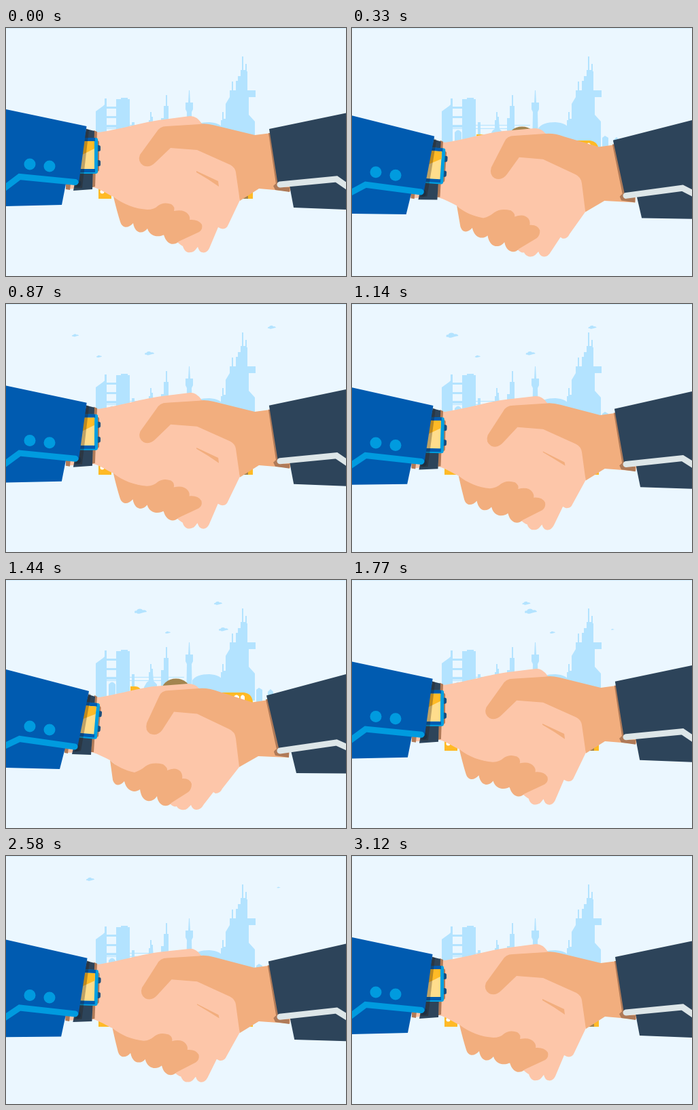
Write an HTML page that moves like this. It is 500 px wide and 366 px high and loops after 3150 ms.

```html
<!DOCTYPE html>
<html lang="en">
<head>
<meta charset="utf-8">
<title>Handshake</title>
<style>
  html, body { margin: 0; width: 100%; height: 100%; overflow: hidden; background: #ebf7ff; }
  svg { display: block; width: 500px; height: 366px; }
  .city, .cloud { fill: #b3e3ff; }
  .wire { fill: none; stroke: #b3e3ff; }
  .gold { fill: #ffba26; }
  .olive { fill: #a3854f; }
  .light { fill: #fdc6a9; }
  .tan { fill: #f2ae7e; }
  .shade { fill: #af7a58; }
  .navy { fill: #2d445a; }
  .shadow { fill: #2a1a10; opacity: .3; }
  .blue { fill: #005bb0; }
  .line { fill: none; stroke-width: 9; stroke-linecap: round; stroke-linejoin: miter; }
  .button { stroke-width: 17; }
  .sky { stroke: #009bdf; }
  .white { stroke: #dde6e8; }
  .brown { stroke: #af7a58; }
  .deep { stroke: #1e3042; }
</style>
</head>
<body>
<svg viewBox="0 0 500 366">
  <rect width="500" height="366" fill="#ebf7ff"/>
  <rect width="500" height="1" fill="#d3edfc"/>
  <g id="clouds"></g>

  <!-- skyline -->
  <g class="city">
    <path d="M132 178V123L143 115 145 113V104H148V178Z"/>
    <path d="M162 178V105H169V103H179V105H182V178Z"/>
    <path d="M148 116H162V119H148ZM148 130H162V133H148ZM148 144H162V147H148Z"/>
    <path d="M151 178V154Q156 147 161 154V178ZM185 178V139H189V178Z"/>
    <path d="M203 178V158L207 151 210 149V136H212V124H214V131H216V136L217 149 222 154V178Z"/>
    <path d="M228 178V133H232V115H235V99H237V115H239V178Z"/>
    <path d="M264 110H268L269 92H270L271 110H275V120L273 124 274 178H265L266 124 264 120Z"/>
    <path d="M274 178V148Q280 139 299 139Q316 140 320 150V178Z"/>
    <path d="M316 178V136H318V124H320V134H323V112L329 102V92H332V79H334V92H338V78H341V71H345V62H347V42H349V62H352V53H354V64H355V92H367V102H357V128L366 138V178Z"/>
    <path d="M368 180V162L372 159 377 162V180ZM385 180V165L389 161 393 165V180Z"/>
  </g>
  <path class="wire" d="M148 143.5H262M148 148.5H262"/>
  <path class="gold" d="M183 178V157H190Q197 157 200 165V178Z"/>
  <ellipse class="olive" cx="250" cy="165" rx="22" ry="19.500"/>
  <path class="gold" d="M318 166H350Q363 168 363 182V252H318Z"/>
  <path d="M335 177V172Q339 167 343 172V177ZM345 177V172Q348 167 351 172V177Z" fill="#fff"/>
  <rect class="olive" x="346" y="248" width="10" height="4"/>
  <rect class="gold" x="136" y="225" width="19" height="27"/>
  <circle cx="141.500" cy="241.500" r="3" fill="#fff"/>

  <!-- left hand and watch -->
  <path class="light" d="M88 230L120 153L137 154C175 148 200 139 232 135L270 130Q280 129 288 141L341 205L344 254L327 290Q324 298 316 296L312 294L299 325Q295 333 288 331Q284 330 282 323L278 328Q274 332 267 331Q262 329 260 322Q256 320 250 314L192 288L158 249C150 246 140 238 128 235L88 238Z"
    data-to="M86 248L122 172L138 173C175 166 195 160 217 157L268 153Q278 153 284 160L342 225L343 276L318 308Q315 315 308 315L305 313L291 331Q286 340 279 339Q274 338 272 332L267 337Q264 340 258 339Q253 338 251 334Q246 336 240 329L190 297L153 266C145 262 136 257 126 254L86 255Z"/>
  <path class="shade" d="M88 230L95 230L94 239L88 238Z" data-to="M86 247L92 247L91 256L86 255Z"/>
  <path class="shade" d="M129 151L134 153L131 234L127 235Z" data-to="M130 170L134 172L129 254L125 254Z"/>
  <path class="navy" d="M118 149L130 152L127 238L99 240L104 212Z" data-to="M121 169L131 172L125 258L97 257L103 230Z"/>
  <g id="watch">
    <rect class="shade" x="128" y="166" width="9" height="46" rx="3"/>
    <rect x="133" y="173" width="6" height="9" rx="2.500" fill="#1b4f7d"/>
    <rect x="133" y="195" width="6" height="9" rx="2.500" fill="#1b4f7d"/>
    <rect x="107" y="162" width="28" height="53" rx="3" fill="#009fe0"/>
    <path class="blue" d="M105 162H131V167H105ZM105 208H131V213H105Z"/>
    <path d="M108 167H130V208H106Z" fill="#ffdd8c"/>
    <path class="gold" d="M108 167H130V178L108 189Z"/>
  </g>
  <path class="shadow" d="M117 148L122 150L112 236L101 236Z" data-to="M121 167L125 169L110 252L100 254Z"/>
  <path class="line deep" d="M106 229L106 230" data-to="M104 247L104 248"/>
  <path class="blue" d="M0 120L118.500 145L107 229L88 230L82 261L0 263Z" data-to="M0 132L122 164L105 247L87 248L79 279L0 277Z"/>
  <path class="line sky" d="M-6 239L20 219.500L102 227.500" data-to="M-6 247L20 234.500L101 246"/>
  <path class="line button sky" d="M35 201L35 201" data-to="M35 216L35 216"/>
  <path class="line button sky" d="M64 204L64 204" data-to="M64 221L64 221"/>

  <!-- right hand -->
  <path class="tan" d="M390 155L366 158L304 143Q292 140 284 142L236 145Q226 145 221 154L197 187Q193 197 202 203Q211 207 219 199L242 177L281 180L330 202Q337 206 338 213L344 255L372 237L418 241L420 200Z"
    data-to="M386 177L362 180.500L314 165Q298 159 284 160L240 163Q228 163 225 172L207 211Q204 222 212 227Q223 231 230 221L247 194.500L281 197.500L328 220Q337 224 338 234L343 276L371 260L416 262L420 220Z"/>
  <path class="tan" d="M158 249C172 260 190 267 208 268Q218 268 224 262Q232 256 243 260Q249 264 247 270Q262 267 268 275Q271 279 270 283Q283 282 288 290Q290 297 284 301L254 315C247 322 236 320 232 305C226 309 212 309 208 296C202 304 190 305 187 288C180 296 171 296 168 286Q163 270 158 249Z"
    data-to="M153 266C162 275 175 281 189 284Q198 281 205 275Q215 268 231 272Q238 277 237 281Q250 275 257 283Q260 288 259 293Q270 292 273 301Q273 309 268 313L243 329C237 337 224 334 222 319C216 329 200 331 197 309C191 314 178 314 174 297C168 304 160 305 157 295Q155 280 153 266Z"/>
  <path id="crease" class="tan" d="M280 211L312 226L313 234Q296 222 280 213Z" data-to="M283 235L314 254L315 252Q299 246 283 235Z"/>
  <path class="shade" d="M386 155L391 155L404 235L417 235L417 242L396 239L393 233L397 230Z" data-to="M382 176L387 176L404 254L416 254L416 262L396 259L394 253L398 250Z"/>
  <path class="line brown" d="M399 233.500L404 234" data-to="M399 254L404 255"/>
  <path class="navy" d="M387 149L500 125.500L500 268L423 265L417 233L400 232Z" data-to="M383 170.500L500 139L500 285.500L427 285L419 252L402 252Z"/>
  <path class="line white" d="M403 231L486 223L506 237" data-to="M403 252L486 240L506 249"/>
</svg>
<script>
const LOOP = 3150, STEP = 30, START = 150, SHAKE = 900, SHAKES = 3;
const FADE = 90;
const $ = id => document.getElementById(id);
const mix = (a, b, p) => a + (b - a) * p;
const clamp = v => Math.min(1, Math.max(0, v));
const ease = v => (1 - Math.cos(Math.PI * clamp(v))) / 2;

const NUMBER = /-?\d+(\.\d+)?/g;
const morphs = [...document.querySelectorAll("[data-to]")].map(el => {
  const from = el.getAttribute("d");
  return { el, from, a: from.match(NUMBER).map(Number), b: el.dataset.to.match(NUMBER).map(Number) };
});

// Each track holds [time, x] pairs
const clouds = [
  { y: 73, w: 14, track: [[430, 127], [540, 148], [1440, 320], [1800, 389]] },
  { y: 46.5, w: 18, track: [[820, 95], [870, 102], [1440, 198], [2130, 334], [2580, 401], [2605, 404]] },
  { y: 77.5, w: 8, track: [[700, 107], [870, 137], [1440, 238], [2130, 357], [2250, 378]] },
  { y: 34.5, w: 12, track: [[720, 412], [870, 391], [1440, 312], [2130, 196], [2580, 124], [2760, 95]] }
];
for (const c of clouds) {
  c.el = document.createElementNS("http://www.w3.org/2000/svg", "path");
  c.el.setAttribute("class", "cloud");
  c.el.setAttribute("d", "M-9 1Q-9 -2 -6 -1Q-5 -4 -1 -4Q2 -4 3 -2Q7 -3 9 0Q9 1 6 1Q2 2 -1 3Q-5 4 -6 2Q-9 3 -9 1Z");
  $("clouds").append(c.el);
}

// 0 is the raised pose, 1 the lowered one
function pose(t) {
  const turn = (t - START) / SHAKE;
  if (turn < 0 || turn >= SHAKES) return 0;
  const u = turn % 1;
  return u < 0.4 ? ease(u / 0.29) : 1 - ease((u - 0.438) / 0.415);
}

function drawCloud({ el, y, w, track }, t) {
  const first = track[0][0], last = track[track.length - 1][0];
  const shown = t >= first && t < last;
  el.style.display = shown ? "" : "none";
  if (!shown) return;
  const i = track.findIndex(k => k[0] > t);
  const [t0, x0] = track[i - 1], [t1, x1] = track[i];
  const x = mix(x0, x1, (t - t0) / (t1 - t0));
  const size = clamp(Math.min(t - first, last - t) / FADE) * w / 18;
  el.setAttribute("transform", `translate(${x} ${y}) scale(${size})`);
}

function draw(t) {
  const p = pose(t);
  for (const { el, from, a, b } of morphs) {
    let i = 0;
    el.setAttribute("d", from.replace(NUMBER, () => mix(a[i], b[i++], p).toFixed(2)));
  }
  $("watch").setAttribute("transform", `translate(${p} ${19 * p}) rotate(${5 * p} 123 188)`);
  $("crease").style.display = p > 0.6 ? "none" : "";
  for (const c of clouds) drawCloud(c, t);
}

const begin = performance.now();
function tick() {
  const t = (performance.now() - begin) % LOOP;
  draw(Math.floor(t / STEP) * STEP);
  requestAnimationFrame(tick);
}
tick();
</script>
</body>
</html>
```
